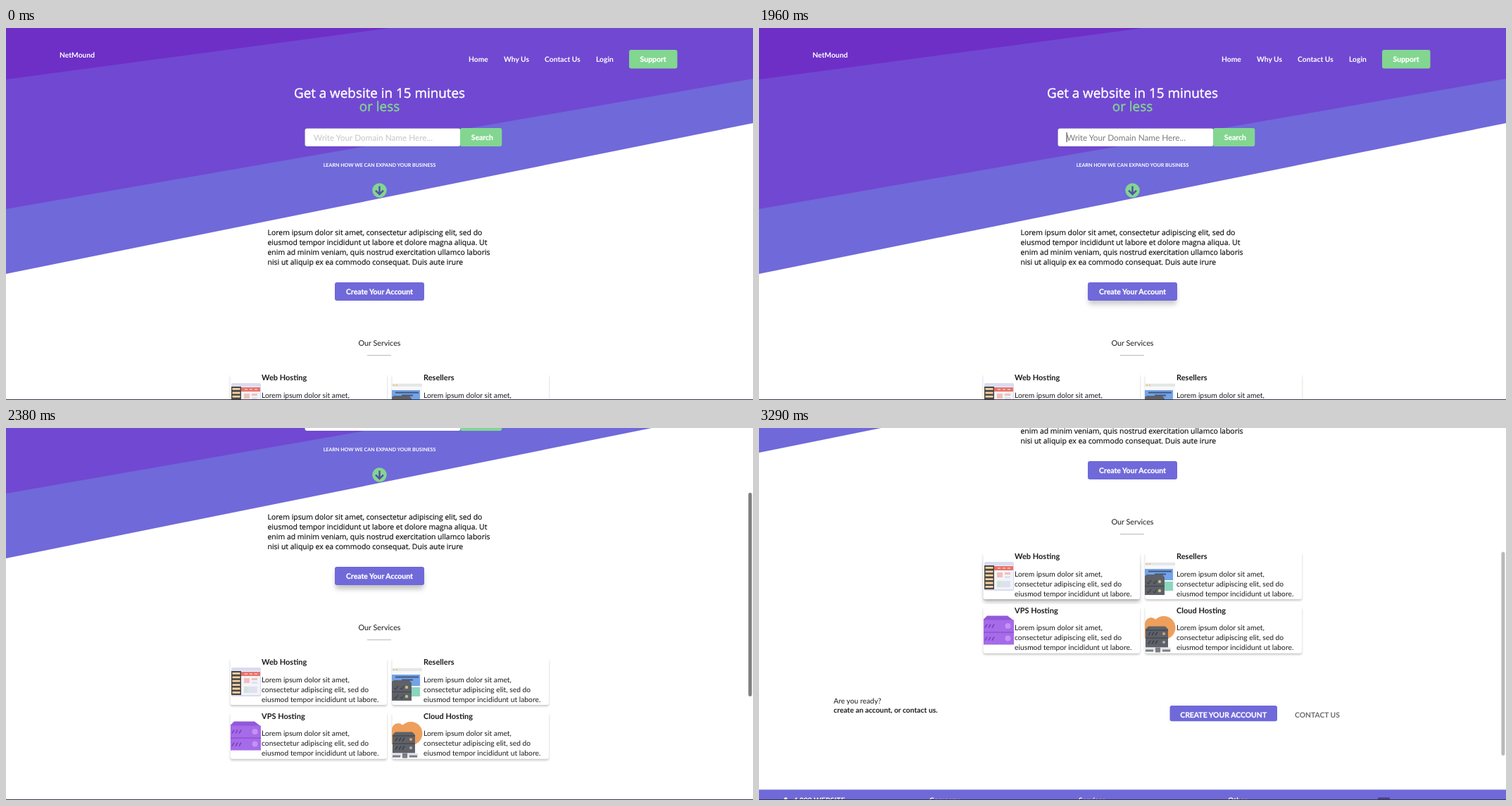
An HTML page for the animation above (3.36 s loop, 1061 px wide and 528 px high).

```html
<!DOCTYPE html>
<html lang="en">
<head>
<meta charset="utf-8">
<title>Hosting landing page</title>
<style>
@property --y { syntax: "<number>"; inherits: true; initial-value: 0; }
html, body { margin: 0; width: 100%; height: 100%; overflow: hidden; background: #fff; }
svg { display: block; }
#stage { --violet: #7069d9; --green: #82d690; animation: scroll 3360ms step-end infinite; }
#page { transform: translateY(calc(var(--y) * -1px)); }
#thumb { fill: #7f7f7f; transform: translateY(calc(var(--y) * .56px)); animation: thumb 3360ms linear infinite; }

text { font: 10.32px Lato, sans-serif; fill: #1c1c1e; text-rendering: geometricPrecision; }
.bold { font-weight: 700; }
.white { fill: #fff; }
.mid { text-anchor: middle; }
.title { font: 500 18.85px "Open Sans", sans-serif; stroke: #fff; stroke-width: .4px; }
.title.green { stroke: var(--green); }
.lead { font: 10.48px "Open Sans", sans-serif; fill: #111; stroke: #111; stroke-width: .2px; }
.label { font-size: 10.45px; font-weight: 700; stroke: #fff; stroke-width: .25px; }
.tag { font-size: 7.1px; }
.name { font-size: 11px; font-weight: 700; }
.green { fill: var(--green); }
.violet { fill: var(--violet); }

.hint { font-size: 11.79px; animation: focus 3360ms step-end infinite; }
.caret { fill: #333; animation: blink 3360ms step-end infinite; }
.card { fill: #fff; filter: drop-shadow(0 2px 1.5px rgba(0, 0, 0, .22)); }
.shade { fill: #000; filter: blur(3.5px); opacity: 0; animation: 3360ms linear infinite; }
#shadeSearch { animation-name: overSearch; }
#shadeCreate { animation-name: overCreate; }
#shadeCard { animation-name: overCard; }

@keyframes scroll {
  0% { --y: 0; }
  62.49% { --y: 8; }
  64.57% { --y: 41; }
  66.65% { --y: 82; }
  68.74% { --y: 124; }
  70.82% { --y: 164; }
  72.9% { --y: 198; }
  74.99% { --y: 226.5; }
  77.07% { --y: 258; }
  79.15% { --y: 291; }
  81.24%, 100% { --y: 314; }
}
@keyframes thumb {
  0%, 62.4% { opacity: 0; }
  62.49%, 91.6% { opacity: 1; }
  97.9% { opacity: .55; }
  100% { opacity: .45; }
}
@keyframes focus {
  0% { fill: #c6c6c6; }
  11.6%, 100% { fill: #7c7c7c; }
}
@keyframes blink {
  0%, 22%, 43%, 63.6%, 100% { opacity: 0; }
  11.6%, 32.4%, 53.2% { opacity: 1; }
}
@keyframes overSearch {
  0%, 18.7% { opacity: 0; }
  27%, 43% { opacity: .34; }
  50%, 100% { opacity: 0; }
}
@keyframes overCreate {
  0%, 54% { opacity: 0; }
  58.3% { opacity: .2; }
  63%, 76% { opacity: .24; }
  83%, 100% { opacity: 0; }
}
@keyframes overCard {
  0%, 83.3% { opacity: 0; }
  87.5%, 100% { opacity: .13; }
}
</style>
</head>
<body>
<svg id="stage" width="1061" height="528" viewBox="0 0 1061 528">
  <g id="page">
    <path class="violet" d="M0 0H1061V135L0 349Z"/>
    <path fill="#7148d2" d="M0 0H1061V72L0 257Z"/>
    <path fill="#6e2fc7" d="M0 0H545L0 73Z"/>

    <text class="bold white" x="76" y="42">NetMound</text>
    <g id="nav"></g>
    <rect class="green" x="885" y="31" width="68.5" height="26.5" rx="3"/>
    <text class="label white mid" x="919.2" y="48">Support</text>

    <text class="title white mid" x="530.5" y="99">Get a website in 15 minutes</text>
    <text class="title green mid" x="530.5" y="117.5">or less</text>

    <rect class="shade" id="shadeSearch" x="646" y="147" width="58" height="25" rx="3"/>
    <rect class="white" x="424.5" y="142.5" width="221" height="25.5" rx="3" stroke="#222" stroke-opacity=".15" stroke-width=".8"/>
    <text class="hint" x="437" y="160">Write Your Domain Name Here...</text>
    <rect class="caret" x="436.6" y="148" width="1" height="14"/>
    <rect class="green" x="645" y="142" width="59.3" height="26" rx="3"/>
    <text class="label white mid" x="676.3" y="159.3">Search</text>

    <text class="bold tag white mid" x="530.5" y="197.2">LEARN HOW WE CAN EXPAND YOUR BUSINESS</text>
    <circle class="green" cx="530.5" cy="230.5" r="10.2"/>
    <path fill="none" stroke="#5450a8" stroke-width="2.5" d="M530.5 224.5V235.6M525 230.6L530.5 236.1L536 230.6"/>

    <g id="lead"></g>

    <rect class="shade" id="shadeCreate" x="468" y="367" width="125" height="25.5" rx="3"/>
    <rect class="violet" x="467" y="361" width="127" height="26" rx="3"/>
    <text class="label white mid" x="530.5" y="377.6">Create Your Account</text>

    <text class="mid" style="font-size:10.8px" x="530.5" y="451.4">Our Services</text>
    <path stroke="#b4b4b4" d="M513 464.7H547"/>

    <rect class="shade" id="shadeCard" x="319" y="503" width="222" height="61" rx="3"/>
    <g id="cards"></g>

    <!-- web page with a rack -->
    <g transform="translate(319 504)">
      <rect x="1" width="42" height="41" rx="2" fill="#d9dcf0"/>
      <rect x="2" y="5" width="40" height="34" fill="#f3f3f9"/>
      <rect x="15" y="6" width="27" height="6" fill="#e8736c"/>
      <path stroke="#f6c8c0" stroke-width="1.5" d="M20 9h4M27 9h4M34 9h4"/>
      <rect x="1" y="5" width="14" height="34" fill="#4a4643"/>
      <path stroke="#f3d3a6" stroke-width="11" stroke-dasharray="2.8 2.6" d="M8 7V38"/>
      <path fill="#f0c0ba" d="M19 15h8v7h-8zM30 15h8v3h-8z"/>
      <path fill="#dfe2ee" d="M30 20h8v3h-8zM19 27h19v9H19z"/>
      <rect x="19" y="27" width="5" height="9" fill="#cfe5d8"/>
    </g>
    <!-- browser with a server -->
    <g transform="translate(548 504)">
      <rect width="43" height="41" fill="#f8f8f9"/>
      <rect y="1" width="43" height="4" fill="#e5e7e7"/>
      <path stroke="#e9c57a" stroke-width="2" stroke-dasharray="2 2" d="M2 3h7"/>
      <rect y="10" width="40" height="16" fill="#73a3e8"/>
      <path stroke="#42587c" stroke-width="1.8" d="M5 13.5H38M14 17.5H30"/>
      <rect x="26" y="28" width="14" height="13" fill="#8ad6bd"/>
      <path fill="#5e6167" d="M0 20L3 18H25L28 22V47H0Z"/>
      <path stroke="#484a50" stroke-width="1.5" d="M0 34.5H28"/>
      <path stroke="#414349" stroke-width="1.3" d="M3 29l2 2 4-5M12 29l2 2 3-5M3 42l2 2 4-5M12 42l2 2 3-5" fill="none"/>
      <g fill="#b7c483"><circle cx="21" cy="28" r="2.2"/><circle cx="21" cy="41" r="2.2"/></g>
    </g>
    <!-- two-unit server -->
    <g transform="translate(319 580.5)">
      <path fill="#9358da" d="M0 5L5 0H34L43 7V15H0Z"/>
      <path fill="#a66be8" d="M0 6H43V41H0Z"/>
      <path stroke="#8c50d2" stroke-width="1.4" d="M0 23.5H43"/>
      <path stroke="#7940bd" stroke-width="1.5" d="M2 17l3-5M7 17l3-5M12 17l3-5M2 35l3-5M7 35l3-5M12 35l3-5"/>
      <circle cx="34.5" cy="14.5" r="4" fill="#c493f2"/>
      <circle cx="34.5" cy="32" r="4" fill="#c493f2"/>
    </g>
    <!-- cloud with a server -->
    <g transform="translate(548 580.5)">
      <g fill="#ee9f5c">
        <circle cx="9" cy="11.5" r="9"/><circle cx="27" cy="17" r="16.5"/>
        <rect y="12" width="26" height="20"/>
      </g>
      <path fill="#5f6269" d="M1 19L5 15H29L33 19V45H1Z"/>
      <path stroke="#484a51" stroke-width="1.3" d="M1 31.5H33M1 20.5H33"/>
      <path stroke="#36383e" stroke-width="1.4" d="M5 28l3-5M10 28l3-5M15 28l3-5M5 40l3-5M10 40l3-5M15 40l3-5"/>
      <circle cx="27" cy="25.5" r="2" fill="#e8a05f"/>
      <circle cx="27" cy="37.5" r="2" fill="#aeb3ba"/>
      <path fill="#e3e5e8" d="M1 45H37V51H1Z"/>
      <path fill="#7a7e85" d="M1 48H12V51H1ZM15 45H22V52H15ZM25 48H36V51H25Z"/>
    </g>

    <text x="106" y="704.7">Are you ready?</text>
    <text class="bold" x="106" y="718.2">create an account, or contact us.</text>
    <rect class="violet" x="583.5" y="708" width="152.5" height="22.3" rx="3"/>
    <text class="label white mid" x="659.7" y="724.7">CREATE YOUR ACCOUNT</text>
    <text class="bold mid" style="fill:#6b6b6b" x="793" y="724.7">CONTACT US</text>

    <rect class="violet" y="827.3" width="1061" height="138"/>
    <circle class="white" cx="38" cy="840.5" r="2.2"/>
    <g id="footer"></g>
    <rect x="879" y="838.5" width="17" height="17" fill="#45418f"/>
  </g>
  <rect id="thumb" x="1054.4" width="5" height="289" rx="2.5"/>
  <rect y="527" width="1061" height="1" fill="#3a3545"/>
</svg>
<script>
const SVG = "http://www.w3.org/2000/svg";

function add(group, tag, attrs, content = "") {
  const node = document.createElementNS(SVG, tag);
  for (const key in attrs) node.setAttribute(key, attrs[key]);
  node.textContent = content;
  document.getElementById(group).append(node);
}
const write = (group, x, y, content, style = "") =>
  add(group, "text", { x, y, class: style }, content);

[["Home", 657], ["Why Us", 707], ["Contact Us", 765], ["Login", 838]]
  .forEach(([label, x]) => write("nav", x, 48, label, "bold white"));

[
  "Lorem ipsum dolor sit amet, consectetur adipiscing elit, sed do",
  "eiusmod tempor incididunt ut labore et dolore magna aliqua. Ut",
  "enim ad minim veniam, quis nostrud exercitation ullamco laboris",
  "nisi ut aliquip ex ea commodo consequat. Duis aute irure"
].forEach((line, i) => write("lead", 371.5, 293.6 + 14 * i, line, "lead"));

const blurb = [
  "Lorem ipsum dolor sit amet,",
  "consectetur adipiscing elit, sed do",
  "eiusmod tempor incididunt ut labore."
];
["Web Hosting", "Resellers", "VPS Hosting", "Cloud Hosting"].forEach((name, i) => {
  const x = 318.5 + 230 * (i % 2), y = 491 + 76.8 * (i >> 1);
  add("cards", "rect", { class: "card", x, y, width: 222.5, height: 66, rx: 3 });
  // the top edge stays open
  add("cards", "rect", { x: x - 3, y: y - 4, width: 229, height: 5, fill: "#fff" });
  write("cards", x + 44.5, y + 9, name, "name");
  blurb.forEach((line, n) => write("cards", x + 44.5, y + 33.5 + 14 * n, line));
});

[["4,000 WEBSITE", 49], ["Company", 242], ["Services", 454], ["Other", 666]]
  .forEach(([label, x]) => write("footer", x, 846, label, "bold white"));
</script>
</body>
</html>
```
